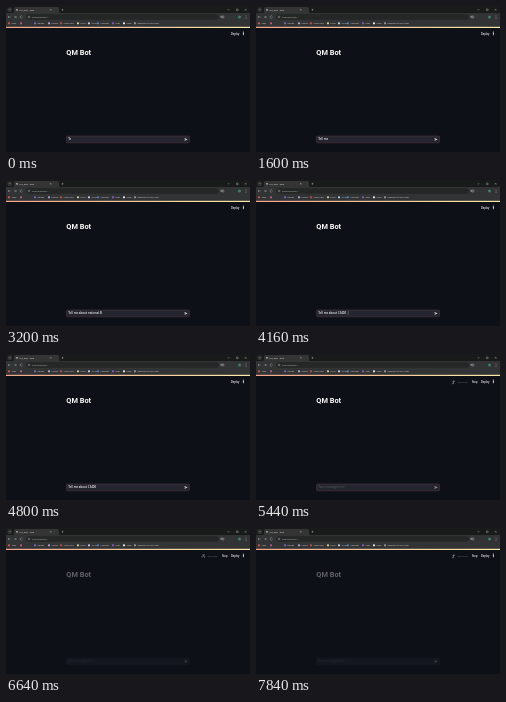
Write an HTML page that moves like this. It is 244 by 146 pixels and loops after 8 s.

```html
<!DOCTYPE html>
<html lang="en">
<head>
<meta charset="utf-8">
<style>
  html, body { margin: 0; height: 100%; overflow: hidden; background: #0e1018; }
  svg { display: block; width: 100vw; height: 100vh; }
  text { font: 2.3px "Open Sans", sans-serif; fill: #ccc; white-space: pre; }
  .line { fill: none; stroke: #bbb; stroke-width: .4; }
  .strong { font-size: 2.5px; font-weight: 600; fill: #fff; }
  #title { font: 700 7.4px Roboto, sans-serif; fill: #fafafa; }
  #message { font-size: 2.9px; font-weight: 600; }
</style>
</head>
<body>
<svg viewBox="0 0 244 146">
  <defs>
    <linearGradient id="stripe">
      <stop stop-color="#f5a68c"/><stop offset="1" stop-color="#fbeaa8"/>
    </linearGradient>
  </defs>

  <rect width="244" height="7" fill="#191a1a"/>
  <path d="M7 7Q8 7 8 5V2.5Q8 1 9.5 1H51.5Q53 1 53 2.5V5Q53 7 54 7Z" fill="#343435"/>
  <rect x="1.5" y="1.5" width="4.5" height="4.5" rx="1.2" fill="#303132"/>
  <circle cx="11" cy="3.8" r=".9" fill="#b9b9bd"/>
  <text x="13.5" y="4.7" style="fill:#eee">my_app · web</text>
  <path class="line" d="M3 3.3l.8.8.8-.8M44 3l1.5 1.5m0-1.5L44 4.5M55.5 3.8h2m-1-1v2M221.5 3.8h2M230.5 3h1.6v1.6h-1.6zM238.8 3l1.6 1.6m0-1.6l-1.6 1.6"/>

  <rect y="7" width="244" height="14" fill="#323334"/>
  <rect x="20" y="8.2" width="193" height="5.6" rx="2.8" fill="#252626"/>
  <path class="line" d="M4.5 11h-2.4m1-1l-1 1 1 1M8 11h2.4m-1-1l1 1-1 1M16.3 10.3a1.2 1.2 0 1 0 .1 1.2M216 10h1.8v2H216z"/>
  <circle class="line" cx="23" cy="11" r=".9"/>
  <text x="26" y="11.9">localhost:8501/</text>
  <path class="line" d="M214.5 10.2h1.5l-.7 1.7z"/>
  <circle cx="233.5" cy="11" r="1.5" fill="#3f8065"/>
  <path d="M240 9.6v3" stroke="#ccc" stroke-width=".6" stroke-dasharray=".6"/>
  <g id="bookmarks"></g>

  <rect y="20.8" width="244" height="1.2" fill="url(#stripe)"/>
  <text x="225" y="28.6" class="strong">Deploy</text>
  <path d="M237.4 25.7v3.5" stroke="#fff" stroke-width="1" stroke-dasharray=".9 .4"/>
  <g id="status">
    <path id="runner" class="line"/>
    <text x="201.5" y="28.5" style="font-size:2.1px;fill:#8b8d94">RUNNING...</text>
    <text x="216" y="28.6" class="strong">Stop</text>
  </g>

  <g id="page">
    <text id="title" x="60.3" y="49.4">QM Bot</text>
    <rect id="field" x="60.4" y="130" width="123.2" height="6.8" rx="1.2" fill="#24252e" stroke-width=".5"/>
    <text x="62.2" y="134.4" id="message"><tspan id="typed"></tspan><tspan id="caret" dx="1" fill="#ddd">|</tspan></text>
    <path id="send" d="M178.6 132l3 1.4-3 1.4v-1.1l1.6-.3-1.6-.3z"/>
  </g>
</svg>
<script>
const $ = id => document.getElementById(id);
const LOOP = 8000;

const bookmarks = [
  [3, '#d65a4a', 'Apps'], [15, '#b95c8c', ''], [29, '#8264c8', 'Design'],
  [43, '#b6a5dc', 'Photos'], [55, '#c65050', 'Video clips'], [72, '#ddd3a0', 'Drive'],
  [83, '#bfd5ee', 'To-do'], [92, '#4c7fd0', 'Calendar'], [107, '#9259c4', 'Chat'],
  [118, '#eee', 'Code'], [129, '#999', 'Reading list and notes']
];
$('bookmarks').innerHTML = bookmarks.map(([x, color, label]) =>
  `<circle cx="${x}" cy="17.3" r="1.1" fill="${color}"/>
   <text x="${x + 2.5}" y="18.1" style="font-size:2.1px;fill:#ddd">${label}</text>`).join('');

// Each step types or deletes evenly: start, end, text, first and last length.
const question = 'Tell me about national B';
const revised = 'Tell me about CS400';
const steps = [
  [80, 960, question, 2, 7], [1600, 1920, question, 7, 10],
  [2240, 2720, question, 10, 24], [3280, 3600, question, 24, 14],
  [3600, 4160, revised, 14, 19]
];

const progress = (t, from, to) => Math.min(1, Math.max(0, (t - from) / (to - from)));

function typedText(t) {
  const [from, to, text, a, b] = steps.findLast(s => t >= s[0]) || steps[0];
  return text.slice(0, Math.round(a + (b - a) * progress(t, from, to)));
}

const poses = [
  'M198 26.5l-.8 1.6 1.2 1 -.2 1.1M197.2 28.1l-.6 1.3h-1.2M196 27.4l1-.6h1l1 .9',
  'M198 26.5l-.6 1.7.5 .9 -.7 1M197.4 28.2l-.2 1.2-1.4.5M196.5 28l.7-1h1l.5 1',
  'M198 26.5l-.8 1.6 1.6.6 -.5 1.2M197.2 28.1l-1 1.1-.9-.4M196 27l1.1-.2 1 .2.9.3'
];

function draw(now) {
  const t = now % LOOP;
  const sent = t >= 4960;
  const fade = progress(t, 5680, 6640);
  $('typed').textContent = sent ? 'Your message here' : typedText(t);
  $('typed').style.fill = sent ? '#4c4e57' : '#f2f2f4';
  $('caret').style.opacity = +(t >= 3760 && t < 4560);
  $('send').style.fill = sent ? '#a0a1a6' : '#e5e5e8';
  $('field').style.stroke = fade > .3 ? '#262730' : '#593a43';
  $('page').style.opacity = 1 - .66 * fade ** 1.5;
  $('status').style.opacity = +(t >= 5200);
  $('runner').setAttribute('d', poses[Math.floor(t / 160) % poses.length]);
  requestAnimationFrame(draw);
}
requestAnimationFrame(draw);
</script>
</body>
</html>
```
